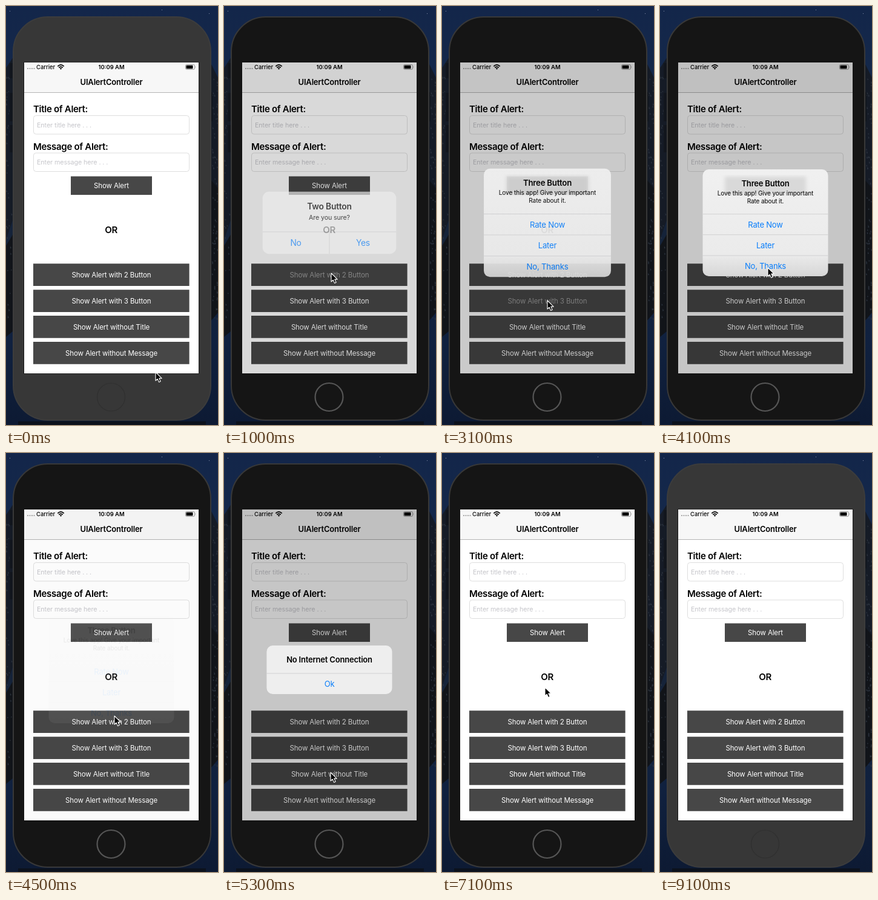
An HTML page that plays this animation: 350 by 690 pixels, repeating every 9300 ms.

```html
<!DOCTYPE html>
<html lang="en">
<head>
<meta charset="utf-8">
<title>UIAlertController</title>
<style>
  html, body { margin: 0; width: 100%; height: 100%; overflow: hidden; background: #13243f; }
  svg { display: block; width: 350px; height: 690px; font-family: Inter, Roboto, sans-serif; }
  text { white-space: pre; }
  .mid { text-anchor: middle; }
  .status { font-size: 9.4px; font-weight: 600; }
  .nav, .title { font-size: 13px; font-weight: 600; letter-spacing: -.2px; }
  .label { font-size: 15px; font-weight: 600; letter-spacing: -.3px; }
  .hint { font-size: 10.75px; letter-spacing: -.1px; fill: #c6c6cb; }
  .btn { font-size: 11.5px; letter-spacing: -.13px; fill: #fff; }
  .msg { font-size: 10px; letter-spacing: -.1px; }
  .act { font-size: 13px; letter-spacing: -.2px; fill: #087dfb; }
  .key { fill: #474747; }
  .field { fill: #fff; stroke: #dedede; }
  .rule { stroke: #c9c9cb; stroke-width: .8; fill: none; }
  .alert { transform-origin: 174px 357px; opacity: 0; }
  .body { fill: #373737; stroke: #3c3c3c; stroke-width: 2; }
  .home { fill: none; stroke: #303030; stroke-width: 1.2; }
  .focus .body { fill: #151515; stroke: #383838; }
  .focus .home { stroke: #565656; stroke-width: 2.2; }
</style>
</head>
<body>
<svg id="stage" viewBox="0 0 350 690">
  <defs>
    <linearGradient id="sky" x2="0" y2="1">
      <stop offset="0" stop-color="#13264a"/>
      <stop offset=".15" stop-color="#14284a"/>
      <stop offset=".55" stop-color="#152339"/>
      <stop offset=".8" stop-color="#10213f"/>
      <stop offset="1" stop-color="#0d1a33"/>
    </linearGradient>
    <linearGradient id="tall" x2="0" y2="1">
      <stop offset="0" stop-color="#f0f0f0"/>
      <stop offset=".8" stop-color="#ebebeb"/>
      <stop offset="1" stop-color="#d6d6d6"/>
    </linearGradient>
    <filter id="soft"><feGaussianBlur stdDeviation="3"/></filter>
  </defs>

  <!-- desktop -->
  <path fill="url(#sky)" d="M0 0H350V690H0z"/>
  <path fill="#151b26" d="M0 102L12 84V350L0 385zM350 118L337 92V470L350 505z"/>
  <path fill="#111419" d="M0 395L12 375V535L0 545zM350 300L337 285V520L350 505z"/>
  <path id="rocks" fill="#2b323d"/>
  <path fill="#8793ab" d="M6 8h1v1h-1zM257 6h1v1h-1zM335 12h1v1h-1z"/>
  <path fill="#0c121d" d="M20 684H330V690H20z"/>

  <!-- phone -->
  <path fill="#12161d" d="M6 94h6v25h-6zM6 143h6v47h-6zM6 196h6v45h-6zM337 142h4v48h-4z"/>
  <rect class="body" x="12" y="18" width="326" height="664" rx="57"/>
  <circle class="home" cx="173.5" cy="644" r="23"/>

  <!-- screen -->
  <path fill="#141414" d="M29 92.500H319V605.500H29z"/>
  <path fill="#fff" d="M30 93H318V605H30z"/>
  <path fill="#f7f7f7" d="M30 93H318V142H30z"/>
  <path stroke="#b4b4b4" d="M30 142.500H318"/>
  <g fill="#999"><circle cx="36" cy="103" r="1.100"/><circle cx="39.500" cy="103" r="1.100"/><circle cx="43" cy="103" r="1.100"/><circle cx="46.500" cy="103" r="1.100"/></g>
  <text class="status" x="50" y="104" style="font-weight:500">Carrier</text>
  <g fill="none" stroke="#000" stroke-width="1.700">
    <path d="M85.300 99.300Q90.500 94.500 95.700 99.300M87.300 101.500Q90.500 98.600 93.700 101.500"/>
    <path fill="#000" stroke="none" d="M88.700 102.700Q90.500 101.200 92.300 102.700L90.500 104.700z"/>
  </g>
  <text class="status mid" x="174" y="104">10:09 AM</text>
  <rect x="296.400" y="96.700" width="15.200" height="7.600" rx="2" fill="none" stroke="#777" stroke-width=".8"/>
  <rect x="297.500" y="97.800" width="11" height="5.400" rx="1"/>
  <path fill="#777" d="M312.600 99.200q1.200 1.300 0 2.600z"/>
  <text class="nav mid" x="174" y="130">UIAlertController</text>

  <text class="label" x="45" y="175.300">Title of Alert:</text>
  <rect class="field" x="45.500" y="180.500" width="257" height="30.500" rx="4"/>
  <text class="hint" x="51" y="199.700">Enter title here . . .</text>
  <text class="label" x="45" y="236.500">Message of Alert:</text>
  <rect class="field" x="45.500" y="242" width="257" height="30.500" rx="4"/>
  <text class="hint" x="51" y="261">Enter message here . . .</text>
  <path class="key" d="M107 280.500h134v30.500h-134z"/>
  <text class="btn mid" x="174" y="300">Show Alert</text>
  <text class="label mid" x="173.700" y="373.700">OR</text>
  <g id="keys"></g>

  <path id="dim" d="M30 93H318V605H30z" opacity="0"/>

  <!-- alerts -->
  <g class="alert" id="two">
    <rect x="70.500" y="309" width="207" height="96" rx="10" fill="#ededed"/>
    <path class="rule" d="M70.500 371H277.500M174 371V405"/>
    <text class="title mid" x="174" y="336.500">Two Button</text>
    <text class="msg mid" x="174" y="352">Are you sure?</text>
    <text class="act mid" x="122" y="392.700">No</text>
    <text class="act mid" x="226" y="392.700">Yes</text>
  </g>
  <g class="alert" id="three">
    <rect x="70.500" y="269" width="207" height="176" rx="10" fill="url(#tall)"/>
    <path fill="#d9d9d9" filter="url(#soft)" d="M107 281h134v29h-134z"/>
    <path class="rule" d="M70.500 342.700h207m-207 34h207m-207 34.300h207"/>
    <text class="title mid" x="174" y="296.500">Three Button</text>
    <text class="msg mid" x="174" y="312">Love this app! Give your important</text>
    <text class="msg mid" x="174" y="324.700">Rate about it.</text>
    <text class="act mid" x="174" y="364.500">Rate Now</text>
    <text class="act mid" x="174" y="398.500">Later</text>
    <text class="act mid" x="174" y="433">No, Thanks</text>
  </g>
  <g class="alert" id="net">
    <rect x="70.500" y="317" width="207" height="80" rx="10" fill="#efefef"/>
    <path class="rule" d="M70.500 363h207"/>
    <text class="title mid" x="174" y="344.700">No Internet Connection</text>
    <text class="act mid" x="174" y="384.700">Ok</text>
  </g>

  <path id="arrow" fill="#000" stroke="#fff" stroke-width="1.100" stroke-linejoin="round"
        d="M0 0V14L3.200 11.100L5.500 16.400L8.100 15.300L5.800 10.100H10.200z"/>
</svg>
<script>
  const LOOP = 9300, STEP = 100, DIM = 0.225;
  const $ = id => document.getElementById(id);

  const names = ['with 2 Button', 'with 3 Button', 'without Title', 'without Message'];
  $('keys').innerHTML = names.map((name, i) => {
    const y = 424.3 + i * 42.9;
    return `<path class="key" d="M45 ${y}h257.600v36.700h-257.600z"/>` +
      `<text class="btn mid" x="174" y="${y + 22.6}">Show Alert ${name}</text>`;
  }).join('');
  const labels = $('keys').querySelectorAll('text');

  // Seeded flecks of light on the rocks beside the phone
  let seed = 7;
  const rnd = () => (seed = seed * 16807 % 2147483647) / 2147483647;
  let rocks = '';
  for (let i = 0; i < 110; i++) {
    const x = rnd() < 0.5 ? rnd() * 9 : 340 + rnd() * 9;
    rocks += `M${x.toFixed(1)} ${(115 + rnd() * 400).toFixed(1)}l2 ${(1 + rnd() * 3).toFixed(1)}l-2 1z`;
  }
  $('rocks').setAttribute('d', rocks);

  const alerts = [
    { id: 'two', key: 0, open: 1000, close: 2300 },
    { id: 'three', key: 1, open: 3000, close: 4400 },
    { id: 'net', key: 2, open: 5000, close: 6700 }
  ];

  // Pointer stops: time, x, y
  const stops = [
    [0, 247, 603], [700, 177, 440], [1300, 177, 440], [2100, 214, 389],
    [2300, 214, 389], [2700, 174, 485], [3200, 174, 485], [3700, 177, 440],
    [4100, 178, 431], [4400, 178, 431], [4500, 179, 433], [4900, 176, 526],
    [5400, 176, 526], [6300, 170, 386], [7700, 170, 386], [8100, 225, 705],
    [LOOP, 225, 705]
  ];

  function pointer(t) {
    const i = stops.findIndex(s => s[0] > t);
    const [t0, x0, y0] = stops[i - 1], [t1, x1, y1] = stops[i];
    const u = (t - t0) / (t1 - t0), e = u * u * (3 - 2 * u);
    return [x0 + (x1 - x0) * e, y0 + (y1 - y0) * e];
  }

  // Share of a transition still to run after the given time
  const rest = ms => ms < 0 ? 1 : ms > 350 ? 0 : 0.33 * 0.21 ** (ms / 100);

  function draw(t) {
    let shade = 0;
    for (const a of alerts) {
      const left = rest(t - a.open), shown = t < a.close ? 1 - left : rest(t - a.close);
      const el = $(a.id);
      el.style.opacity = shown;
      el.style.transform = `scale(${1 + 0.2 * left})`;
      shade += shown;
      const pressed = t >= a.open - 100 && t < a.open + 300;
      labels[a.key].style.opacity = pressed ? 0.45 : 1;
    }
    $('dim').setAttribute('opacity', shade * DIM);
    $('arrow').setAttribute('transform', `translate(${pointer(t)})`);
    $('stage').classList.toggle('focus', t >= 800 && t < 8100);
  }

  function tick() {
    draw(Math.floor(performance.now() % LOOP / STEP) * STEP);
    requestAnimationFrame(tick);
  }
  tick();
</script>
</body>
</html>
```
